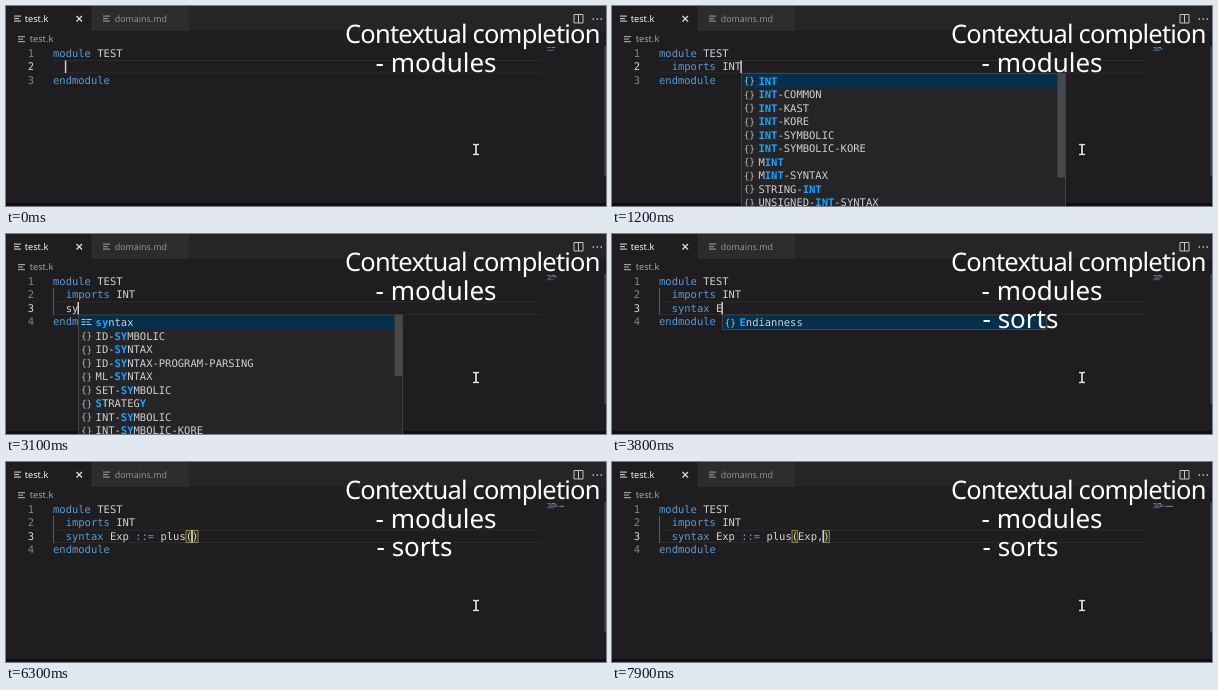
An HTML page with a canvas that plays this animation: 600 px wide and 200 px high, repeating every 8 s.

```html
<!DOCTYPE html>
<html lang="en">
<head>
<meta charset="utf-8">
<title>Contextual completion</title>
<style>
html, body { margin: 0; width: 100%; height: 100%; overflow: hidden; background: #1f1d20; }
canvas { display: block; }
</style>
</head>
<body>
<canvas id="stage" width="600" height="200"></canvas>
<script>
const ctx = document.getElementById('stage').getContext('2d');
const MONO = '"DejaVu Sans Mono", monospace', SANS = '"Noto Sans", "Open Sans", sans-serif';
const CHAR = 6.32, ROW = 13.5, LEFT = 47, TOP = 40.5;
const BLUE = '#569cd6', TEXT = '#d4d4d4', MATCH = '#18a3ff';
const LOOP = 8000;

const list = (names, thumb = 0) => ({ names: names.split(' '), thumb });
const ints = 'INT INT-COMMON INT-KAST INT-KORE INT-SYMBOLIC INT-SYMBOLIC-KORE ';
const lists = {
  imports: list('imports'),
  i: list('ID ID-COMMON ID-SYMBOLIC ID-SYNTAX ID-SYNTAX-PROGRAM-PARSING INT INT-COMMON INT-KAST INT-KORE INT-SYMBOLIC', 104),
  int: list(ints + 'MINT MINT-SYNTAX STRING-INT UNSIGNED-INT-SYNTAX', 104),
  s: list('syntax SET SET-KAST-SYMBOLIC SET-SYMBOLIC STRING STRING-COMMON STRING-KAST STRATEGY SORT-BOOL', 40),
  sy: list('syntax ID-SYMBOLIC ID-SYNTAX ID-SYNTAX-PROGRAM-PARSING ML-SYNTAX SET-SYMBOLIC STRATEGY INT-SYMBOLIC INT-SYMBOLIC-KORE', 61),
  syntax: list('syntax'),
  e: list('Endianness'),
  p: list('Exp Map MapItem RangeMap'),
  exp: list('Exp Endianness IOError Stream')
};

// [time, edited line, text before the caret, popup list, text after the caret, caret hidden]
const steps = [
  [0, 1, '  '],
  [100, 1, '  i'],
  [200, 1, '  impo', 'imports'],
  [300, 1, '  imports'],
  [400, 1, '  imports '],
  [600, 1, '  imports I'],
  [700, 1, '  imports I', 'i'],
  [900, 1, '  imports IN', 'int'],
  [1100, 1, '  imports INT', 'int'],
  [1500, 1, '  imports INT'],
  [1900, 2, '  '],
  [2400, 2, '  ', '', '', true],
  [2500, 2, '  s'],
  [2600, 2, '  s', 's'],
  [3100, 2, '  sy', 'sy'],
  [3200, 2, '  synt', 'syntax'],
  [3300, 2, '  synta', 'syntax'],
  [3600, 2, '  syntax'],
  [3700, 2, '  syntax '],
  [3800, 2, '  syntax E', 'e'],
  [4200, 2, '  syntax E', 'e', '', true],
  [4400, 2, '  syntax Ex'],
  [4600, 2, '  syntax Exp '],
  [4800, 2, '  syntax Exp ::='],
  [5000, 2, '  syntax Exp ::= '],
  [5500, 2, '  syntax Exp ::= p'],
  [5600, 2, '  syntax Exp ::= p', 'p'],
  [5800, 2, '  syntax Exp ::= plu'],
  [6000, 2, '  syntax Exp ::= plus'],
  [6300, 2, '  syntax Exp ::= plus(', '', ')'],
  [6600, 2, '  syntax Exp ::= plus(E', '', ')'],
  [6700, 2, '  syntax Exp ::= plus(E', 'exp', ')'],
  [6900, 2, '  syntax Exp ::= plus(Exp', '', ')'],
  [7400, 2, '  syntax Exp ::= plus(Exp', '', ')', true],
  [7800, 2, '  syntax Exp ::= plus(Exp,', '', ')']
];

function rect(x, y, w, h, color) {
  ctx.fillStyle = color;
  ctx.fillRect(x, y, w, h);
}

function label(text, x, y, font, color, spacing = 0) {
  ctx.font = `${font} ${SANS}`;
  ctx.letterSpacing = spacing + 'px';
  ctx.fillStyle = color;
  ctx.fillText(text, x, y);
  ctx.letterSpacing = '0px';
}

// Monospace text; colorAt(i) gives the colour of each character
function mono(text, x, y, colorAt, bold = '') {
  [...text].forEach((c, i) => {
    const color = colorAt(i);
    ctx.font = `${bold && color === MATCH ? 'bold ' : ''}10.5px ${MONO}`;
    ctx.fillStyle = color;
    ctx.fillText(c, x + i * CHAR, Math.round(y));
  });
}

function stroke(path, color, width = 1) {
  ctx.strokeStyle = color;
  ctx.lineWidth = width;
  ctx.stroke(new Path2D(path));
}

function fileIcon(x, y, color) {
  [7, 5, 7].forEach((w, i) => rect(x, y + i * 2.5, w, 1.2, color));
}

function tokens(line) {
  return [...line.matchAll(/\S+/g)].map(m => ({
    text: m[0], col: m.index,
    color: /^(module|imports|endmodule|syntax|::=)$/.test(m[0]) ? BLUE : TEXT
  }));
}

function frameUI() {
  rect(0, 0, 600, 200, '#1f1d20');
  rect(85, 0, 515, 25, '#252427');
  rect(86, 0, 97, 25, '#2c2b2e');
  fileIcon(8, 9.5, '#c0c0c0');
  label('test.k', 18.7, 16, '500 9.2px', '#f4f4f4');
  stroke('M70.5 10l5.5 5.5M76 10l-5.5 5.5', '#e0e0e0', 1.2);
  fileIcon(97, 9.5, '#909090');
  label('domains.md', 108.7, 16, '500 8.9px', '#929292');
  stroke('M568 8.5h9v8.5h-9zM572.5 8.5v8.5', '#c5c5c5');
  [587, 591, 595].forEach(x => rect(x - 0.5, 12.3, 1.5, 1.5, '#c5c5c5'));
  fileIcon(12, 30, '#a0a0a0');
  label('test.k', 23.7, 36, '500 9.2px', '#a5a5a5');
  rect(598.5, 40, 1.5, 130, '#4b4c48');
  rect(0, 197, 600, 3, '#130c10');
}

function editor(lines, active) {
  const y = TOP + active * ROW;
  rect(LEFT, y, 488, 1, '#2b2a2c');
  rect(LEFT, y + ROW - 1, 488, 1, '#2b2a2c');
  if (active === 2) rect(LEFT, TOP + ROW, 1, 2 * ROW, '#5c5c5e');
  lines.forEach((line, row) => {
    const top = TOP + row * ROW, base = top + 10.2;
    mono(String(row + 1), 21.7, base, () => row === active ? '#d8d8d8' : '#858585');
    [...line].forEach((c, col) => {
      if (c !== '(' && c !== ')') return;
      const box = [LEFT + col * CHAR + 0.3, top + 1, CHAR - 0.6, ROW - 1.5];
      rect(...box, '#2c2e1f');
      ctx.strokeStyle = '#8c8a3c';
      ctx.lineWidth = 1;
      ctx.strokeRect(...box);
    });
    for (const { text, col, color } of tokens(line)) {
      mono(text, LEFT + col * CHAR, base, () => color);
      ctx.globalAlpha = 0.6;
      rect(541 + col * 0.74, 41 + row * 1.4, text.length * 0.74, 1, color);
      ctx.globalAlpha = 1;
    }
  });
}

// Indices to highlight: a contiguous hit if there is one, else letters in order
function matches(name, word) {
  const s = name.toLowerCase(), at = s.indexOf(word);
  if (at >= 0) return [...word].map((c, i) => at + i);
  let from = -1;
  return [...word].map(c => from = s.indexOf(c, from + 1));
}

function popup({ names, thumb }, x, y, word) {
  const h = names.length * ROW;
  rect(x - 0.5, y - 0.5, 325, h + 2, '#434345');
  rect(x + 0.5, y + 0.5, 323, h, '#252528');
  rect(x + 0.5, y + 0.5, 323, ROW, '#062f4c');
  names.forEach((name, i) => {
    const top = y + i * ROW, hits = matches(name, word);
    if (/^[a-z]/.test(name)) {
      [4, 6.5, 9].forEach((dy, k) => {
        rect(x + 3, top + dy, 4, 1, '#c5c5c5');
        rect(x + 8, top + dy, k === 1 ? 3 : 5, 1, '#c5c5c5');
      });
    } else {
      ctx.font = `9.5px ${MONO}`;
      ctx.fillStyle = '#b5b5b5';
      ctx.fillText('{', x + 2.3, top + 10.7);
      ctx.fillText('}', x + 7.8, top + 10.7);
    }
    mono(name, x + 17, top + 11, k => hits.includes(k) ? MATCH : '#cfcfcf', 'bold');
  });
  if (thumb) rect(x + 316, y, 7.5, thumb, '#48484a');
}

function overlay(t) {
  label('Contextual completion', 339, 37, '25.5px', '#fff', -0.8);
  label('- modules', 369.5, 65.5, '26px', '#fff');
  if (t >= 3600) label('- sorts', 370.5, 93.5, '26px', '#fff');
  const beam = 'M467 138.5h2l1 1l1-1h2M470 139v9M467 148.5h2l1-1l1 1h2';
  stroke(beam, '#111', 3.5);
  stroke(beam, '#e4e4e4', 1.7);
}

function draw() {
  const t = performance.now() % LOOP;
  const [, row, before, pop, after = '', hidden] = steps.findLast(s => s[0] <= t);
  const lines = ['module TEST', ...(row === 2 ? ['  imports INT'] : []), before + after, 'endmodule'];
  const x = LEFT + before.length * CHAR, y = TOP + row * ROW;
  ctx.textRendering = 'geometricPrecision';
  frameUI();
  editor(lines, row);
  if (!hidden) rect(x - 0.8, y + 0.5, 1.5, ROW - 1, '#d0d0d0');
  if (pop) popup(lists[pop], x + 0.3, y + ROW, before.match(/\w*$/)[0].toLowerCase());
  overlay(t);
  requestAnimationFrame(draw);
}
draw();
</script>
</body>
</html>
```
